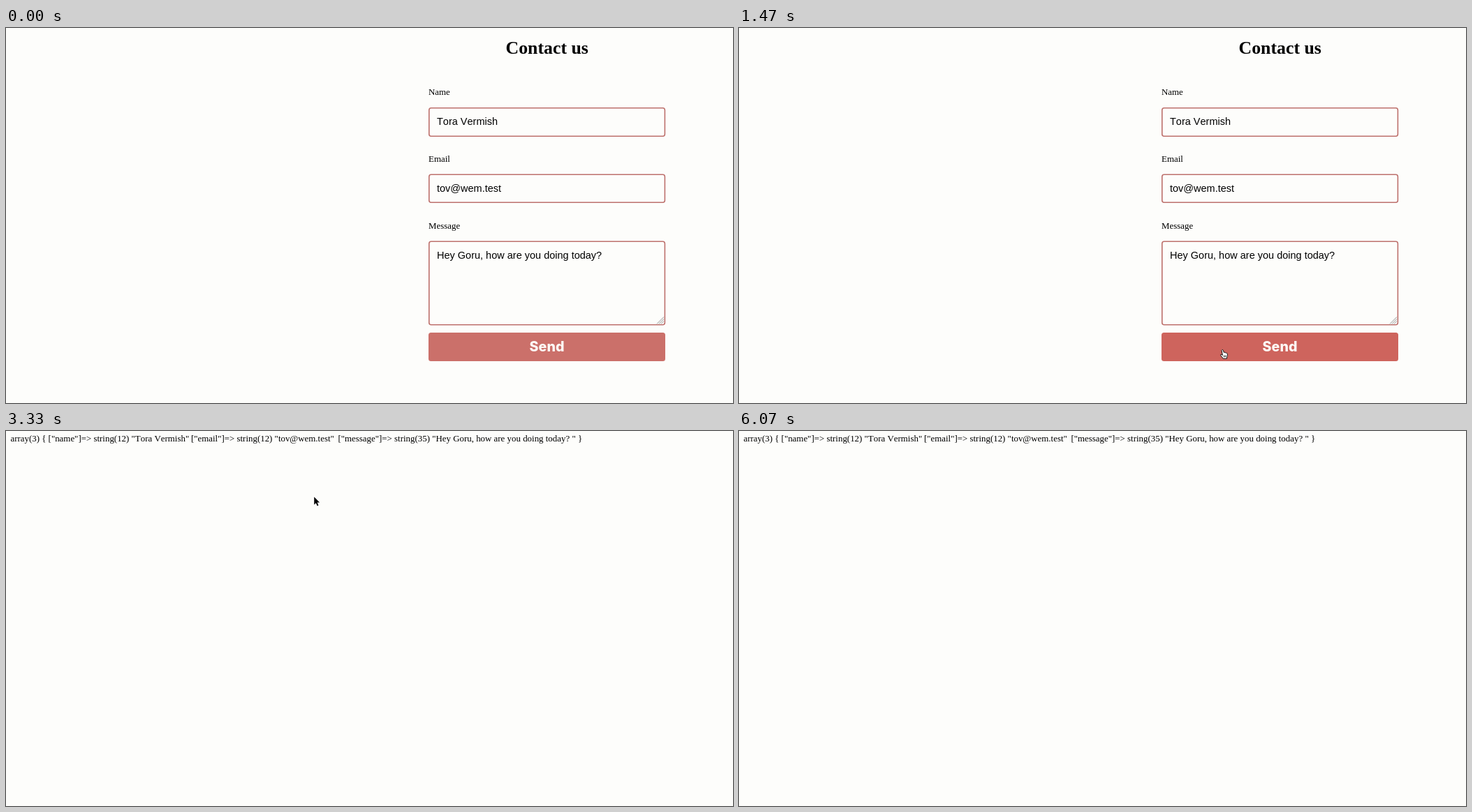
An HTML page with a canvas that plays this animation: 1041x538 px, repeating every 6140 ms.

```html
<!DOCTYPE html>
<html lang="en">
<head>
<meta charset="utf-8">
<title>Contact form</title>
<style>
  html, body { margin: 0; width: 100%; height: 100%; overflow: hidden; background: #fdfdfb; }
  canvas { display: block; }
</style>
</head>
<body>
<canvas id="stage" width="1041" height="538"></canvas>
<script>
const ctx = document.getElementById('stage').getContext('2d');
const LOOP = 6140, SWITCH = 2340;
const SERIF = '"Liberation Serif", "Times New Roman", serif';
const SANS = '"Liberation Sans", Arial, sans-serif';
const PAPER = '#fdfdfb', LINE = '#bd706c';

const person = 'Tora Vermish';
const email = 'tov@wem.test';
const message = 'Hey Goru, how are you doing today?';

// Pointer hotspot: time, x, y
const path = [
  [350, 725, 545], [700, 702, 479], [900, 694, 463], [1300, 694, 463],
  [1700, 689, 459], [2400, 690, 458], [2850, 690, 458], [3400, 430, 78],
  [3750, 150, 10], [4070, 264, 7], [4600, 830, 23], [5050, 830, 23],
  [5330, 770, 476], [5500, 750, 545]
];

// Button colour: time, r, g, b
const shades = [
  [880, 203, 112, 106], [1130, 206, 101, 94], [1400, 206, 101, 94], [1900, 204, 91, 81]
];

const smooth = u => u * u * (3 - 2 * u);

function sample(keys, t) {
  if (t <= keys[0][0]) return keys[0].slice(1);
  const i = keys.findIndex(k => k[0] > t);
  if (i < 0) return keys[keys.length - 1].slice(1);
  const a = keys[i - 1], b = keys[i];
  const u = smooth((t - a[0]) / (b[0] - a[0]));
  return a.slice(1).map((v, n) => v + (b[n + 1] - v) * u);
}

function text(str, x, y, font, color = '#000', align = 'left') {
  ctx.font = font;
  ctx.fillStyle = color;
  ctx.textAlign = align;
  ctx.fillText(str, x, y);
}

function field(label, value, y, h) {
  text(label, 605, y - 18, `12.92px ${SERIF}`);
  ctx.strokeStyle = LINE;
  ctx.lineWidth = 1.6;
  ctx.beginPath();
  ctx.roundRect(605.8, y + 0.8, 337.6, h - 1.6, 3);
  ctx.stroke();
  text(value, 617, y + 25, `14.5px ${SANS}`);
}

function resizer() {
  ctx.strokeStyle = '#777';
  ctx.lineWidth = 0.8;
  ctx.beginPath();
  for (const d of [10, 7, 4]) {
    ctx.moveTo(942 - d, 424.5);
    ctx.lineTo(942, 424.5 - d);
  }
  ctx.stroke();
}

function drawForm(t) {
  text('Contact us', 774.7, 36.5, `bold 25.84px ${SERIF}`, '#000', 'center');
  field('Name', person, 114, 42);
  field('Email', email, 209.5, 41.5);
  field('Message', message, 305.5, 121);
  resizer();
  ctx.fillStyle = `rgb(${sample(shades, t).map(Math.round).join()})`;
  ctx.beginPath();
  ctx.roundRect(605, 437, 339, 41, 3.5);
  ctx.fill();
  text('Send', 774.5, 464.3, '800 19.7px Inter, "Open Sans", sans-serif', '#fdfaf6', 'center');
}

function drawDump() {
  const font = `12.92px ${SERIF}`;
  text(`array(3) { ["name"]=> string(12) "${person}"`, 6.4, 14.8, font);
  text(`["email"]=> string(12) "${email}"`, 264.9, 14.8, font);
  text(`["message"]=> string(35) "${message} " }`, 475.4, 14.8, font);
}

const arrow = new Path2D('M0 0V11.2L2.6 8.8L4.4 13L6.2 12.2L4.4 8.1H7.8Z');
const hand = new Path2D(
  'M-1 1Q0 -1 1.2 .8L2.2 4Q3.4 3.2 4 4.4Q5.2 3.8 5.7 5Q7 4.6 7.2 6' +
  'L7.4 9Q7.2 10.5 6.5 11.4V12.8H1.2Q-.4 10.4 -2.4 8.3Q-2.8 6.6 -1 7L.4 8Z');
const creases = new Path2D('M2.2 8.2V10.8M3.8 8.2V10.8M5.3 8.2V10.8');
const beam = new Path2D('M-2.8 -6Q0 -6 0 -4.5Q0 -6 2.8 -6M0 -4.5V4.5M-2.8 6Q0 6 0 4.5Q0 6 2.8 6M-1.5 2H1.5');

function outline(shape, color, width) {
  ctx.strokeStyle = color;
  ctx.lineWidth = width;
  ctx.stroke(shape);
}

function drawPointer(t) {
  if (t < path[0][0] || t > path[path.length - 1][0]) return;
  const [x, y] = sample(path, t);
  const onButton = t < SWITCH && y < 478;
  const onText = t >= SWITCH && y < 19 && x < 824;
  ctx.save();
  ctx.translate(x, y);
  ctx.lineJoin = 'round';
  if (onButton) {
    ctx.fillStyle = '#fff';
    ctx.fill(hand);
    outline(hand, '#111', 1);
    outline(creases, '#111', 0.8);
  } else if (onText) {
    outline(beam, '#fff', 2.4);
    outline(beam, '#000', 1.1);
  } else {
    outline(arrow, '#fff', 1.6);
    ctx.fillStyle = '#000';
    ctx.fill(arrow);
  }
  ctx.restore();
}

function draw(t) {
  ctx.fillStyle = PAPER;
  ctx.fillRect(0, 0, 1041, 538);
  ctx.fontKerning = 'none';
  if (t < SWITCH) drawForm(t);
  else drawDump();
  drawPointer(t);
}

const start = performance.now();
function tick() {
  draw((performance.now() - start) % LOOP);
  requestAnimationFrame(tick);
}
tick();
</script>
</body>
</html>
```
